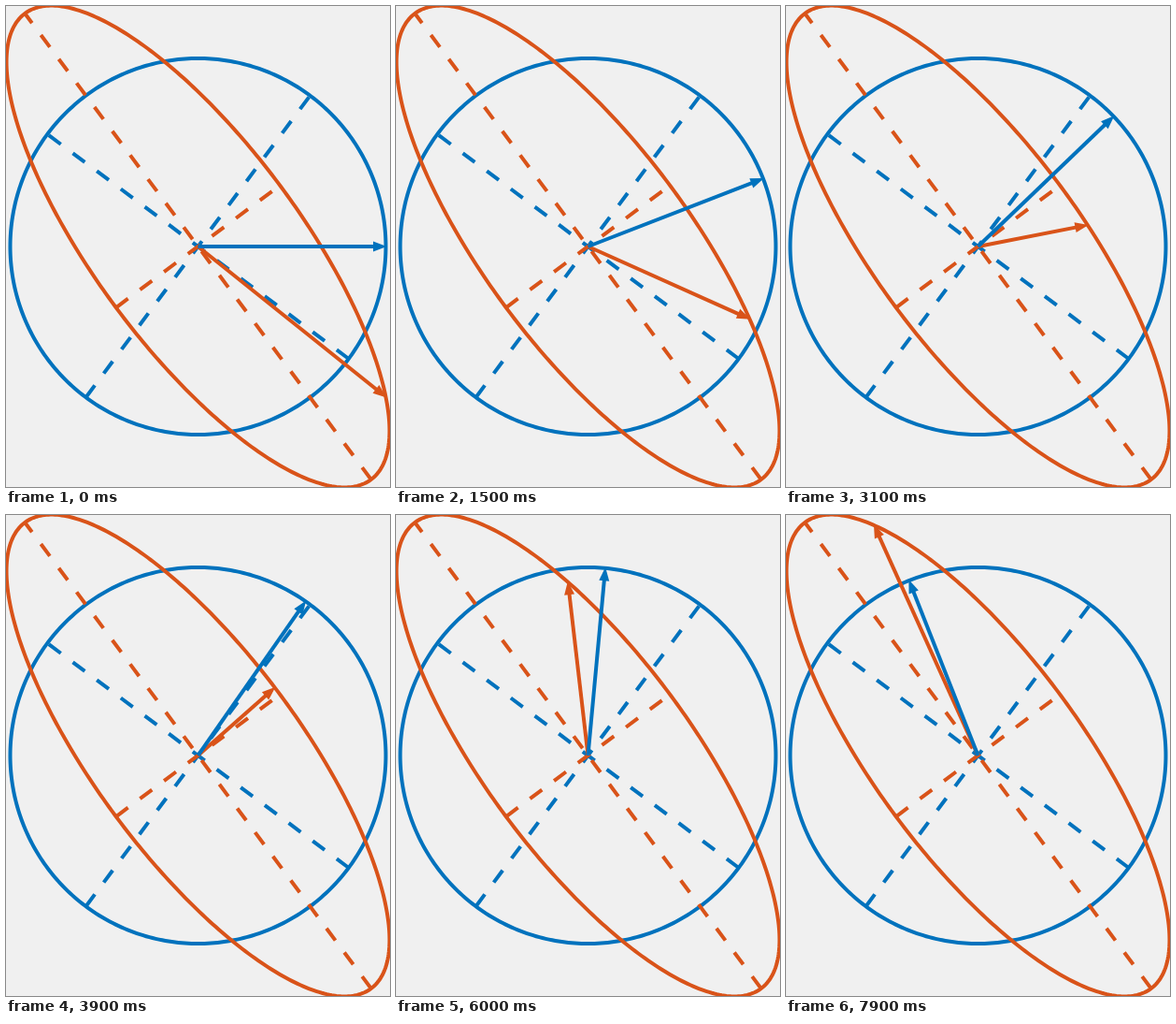
These frames come from a looping animation (411 px wide and 514 px high, 8000 ms). An HTML page with a canvas:

```html
<!DOCTYPE html>
<html lang="en">
<head>
<meta charset="utf-8">
<title>Circle and its linear image</title>
<style>
  html, body { margin: 0; width: 100%; height: 100%; overflow: hidden; background: #f0f0f0; }
  canvas { display: block; }
</style>
</head>
<body>
<canvas id="stage" width="411" height="514"></canvas>
<script>
const ctx = document.getElementById('stage').getContext('2d');
const BLUE = '#0072bd', RED = '#d95319';
const CX = 205.5, CY = 257, R = 201;
const STEP_MS = 100, STEPS = 80, TURN = 2 * Math.PI / 255;

const unit = a => [Math.cos(a), Math.sin(a)];
const same = p => p;
const shear = ([x, y]) => [x - 0.2 * y, -0.8 * x + y];
const toStage = ([x, y]) => [CX + R * x, CY - R * y];

// Direction that the matrix stretches most
const MAJOR = Math.atan2(-2, 0.6) / 2;

function curve(map, color) {
  ctx.beginPath();
  for (let i = 0; i < 360; i++) ctx.lineTo(...toStage(map(unit(i * Math.PI / 180))));
  ctx.closePath();
  ctx.strokeStyle = color;
  ctx.stroke();
}

function diameter(map, angle, color) {
  ctx.setLineDash([16, 16]);
  ctx.beginPath();
  ctx.moveTo(...toStage(map(unit(angle))));
  ctx.lineTo(...toStage(map(unit(angle + Math.PI))));
  ctx.strokeStyle = color;
  ctx.stroke();
  ctx.setLineDash([]);
}

function arrow(map, angle, color) {
  const [x, y] = toStage(map(unit(angle)));
  const len = Math.hypot(x - CX, y - CY);
  ctx.save();
  ctx.translate(CX, CY);
  ctx.rotate(Math.atan2(y - CY, x - CX));
  ctx.strokeStyle = ctx.fillStyle = color;
  ctx.beginPath();
  ctx.moveTo(0, 0);
  ctx.lineTo(len - 8, 0);
  ctx.stroke();
  ctx.beginPath();
  ctx.moveTo(len + 1, 0);
  ctx.lineTo(len - 13.5, -5.5);
  ctx.lineTo(len - 13.5, 5.5);
  ctx.fill();
  ctx.restore();
}

function draw(step) {
  ctx.fillStyle = '#f0f0f0';
  ctx.fillRect(0, 0, 411, 514);
  ctx.lineWidth = 4;
  for (const [map, color] of [[same, BLUE], [shear, RED]]) {
    curve(map, color);
    diameter(map, MAJOR, color);
    diameter(map, MAJOR - Math.PI / 2, color);
  }
  arrow(shear, step * TURN, RED);
  arrow(same, step * TURN, BLUE);
}

const start = performance.now();
function tick() {
  draw(Math.floor((performance.now() - start) / STEP_MS) % STEPS);
  requestAnimationFrame(tick);
}
tick();
</script>
</body>
</html>
```
